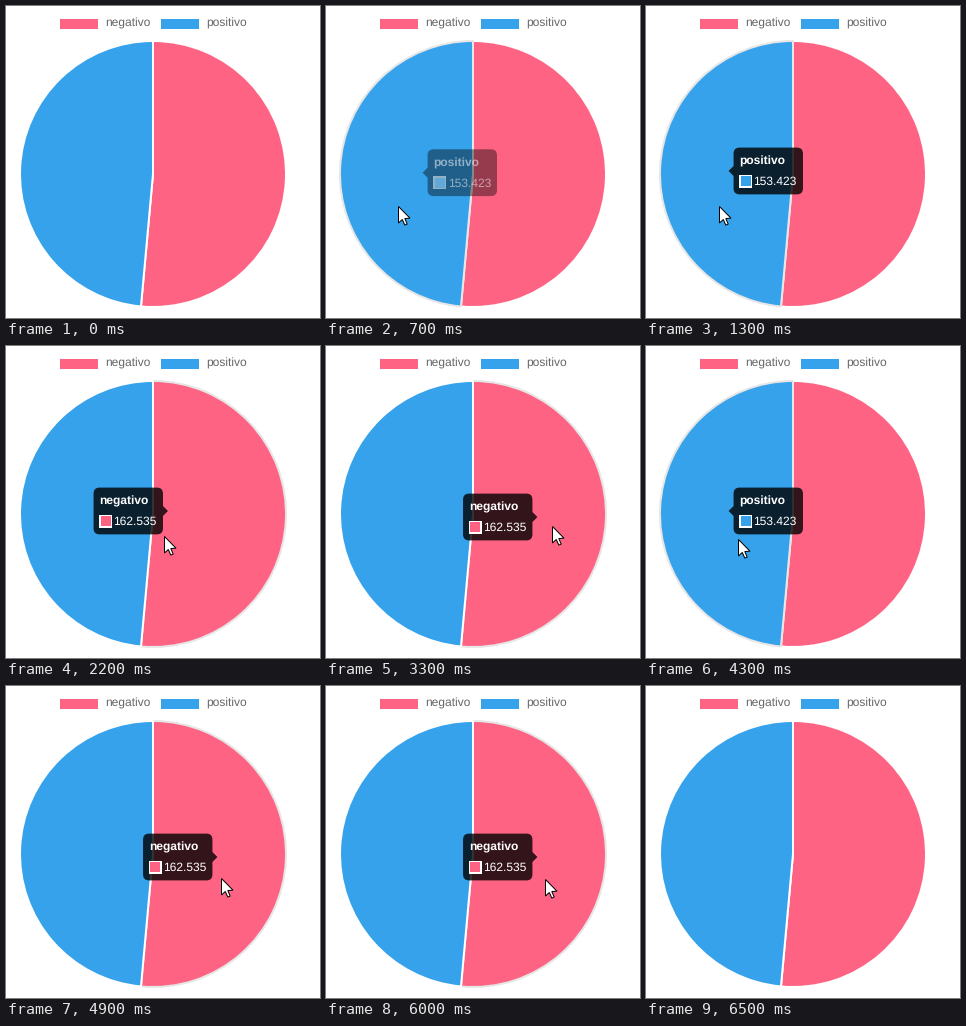
Write a matplotlib script that moves like this. It is 314x312 px and loops after 7300 ms.

```python
import numpy as np
import matplotlib.pyplot as plt
from matplotlib.animation import FuncAnimation
from matplotlib.patches import PathPatch, Polygon, Rectangle, Wedge
from matplotlib.path import Path

W, H, DPI = 314, 312, 64
FRAMES, STEP = 73, 100
PT = 72 / DPI  # points per pixel

plt.rcParams["font.family"] = "Liberation Sans"
plt.rcParams["text.hinting"] = "none"

LABELS = ["negativo", "positivo"]
VALUES = [162535, 153423]
COLORS = ["#ff6384", "#36a2eb"]
HOVER_EDGE = "#e6e6e6"

CX, CY, R = 147, 168, 133
TIP_W, TIP_H, CORNER, CARET = 69.4, 46.8, 6, 5

# (visible from, tween start, hovered slice)
HOVERS = [(0, 0, None), (600, 600, 1), (2200, 2200, 0), (3400, 3400, 1),
          (4900, 4500, 0), (6500, 6500, None)]
TWEEN = 370

# time, x, y of the pointer tip
POINTER = np.array([
    (600, 72, 200), (1200, 72, 200), (1300, 73, 200), (2000, 73, 200),
    (2100, 104, 197), (2200, 158, 190), (2300, 198, 184), (2400, 220, 181),
    (2500, 228, 181), (2600, 229, 181), (3200, 229, 181), (3300, 226, 180),
    (3400, 140, 186), (3500, 106, 191), (3600, 95, 193), (3700, 91, 193),
    (4200, 91, 193), (4300, 92, 193), (4800, 92, 193), (4900, 215, 192),
    (5000, 218, 192), (5100, 219, 193)])
ARROW = np.array([(0, 0), (0, 16.5), (3.8, 13), (6.3, 18.6),
                  (8.7, 17.6), (6.3, 12), (11.5, 11.7)])

fig = plt.figure(figsize=(W / DPI, H / DPI), dpi=DPI, facecolor="white")
ax = fig.add_axes([0, 0, 1, 1])
ax.set_xlim(0, W)
ax.set_ylim(H, 0)
ax.axis("off")


def label(x, y, text, color="white", **kw):
    return ax.text(x, y, text, color=color, fontsize=12 * PT,
                   va="baseline", **kw)


def box(color, size, **kw):
    return ax.add_patch(Rectangle((0, 0), size, size, fc=color, lw=0, **kw))


def tip_home(i):
    """Top-left corner of the tooltip when it rests on slice i."""
    mid = np.radians((edges[i] + edges[i + 1]) / 2)
    x, y = CX + R / 2 * np.cos(mid), CY + R / 2 * np.sin(mid)
    x += 2 + CARET if i == 1 else -2 - CARET - TIP_W
    return np.array([x, y - TIP_H / 2])


def bubble(x, y, caret_left):
    """Rounded box with a caret on one side."""
    r, b, c, m = x + TIP_W, y + TIP_H, CORNER, y + TIP_H / 2
    M, L, Q = Path.MOVETO, Path.LINETO, Path.CURVE3
    pts = [(M, x + c, y), (L, r - c, y), (Q, r, y), (Q, r, y + c)]
    if not caret_left:
        pts += [(L, r, m - CARET), (L, r + CARET, m), (L, r, m + CARET)]
    pts += [(L, r, b - c), (Q, r, b), (Q, r - c, b),
            (L, x + c, b), (Q, x, b), (Q, x, b - c)]
    if caret_left:
        pts += [(L, x, m + CARET), (L, x - CARET, m), (L, x, m - CARET)]
    pts += [(L, x, y + c), (Q, x, y), (Q, x + c, y)]
    return Path([p[1:] for p in pts], [p[0] for p in pts])


edges = -90 + 360 * np.cumsum([0] + VALUES) / sum(VALUES)
slices = [ax.add_patch(Wedge((CX, CY), R, edges[i], edges[i + 1],
                             fc=COLORS[i], ec="white", lw=2 * PT,
                             joinstyle="bevel", zorder=1 + i))
          for i in range(2)]

for x, name, color in zip((54, 155), LABELS, COLORS):
    ax.add_patch(Rectangle((x, 13), 38, 10, fc=color, lw=0))
    label(x + 45, 21, name, "#666666")

tip = ax.add_patch(PathPatch(bubble(0, 0, True), fc="black", lw=0, zorder=5))
frame_box = box("white", 13, zorder=6)
key_box = box("white", 10, zorder=7)
title = label(0, 0, "", weight="bold", zorder=7)
value = label(0, 0, "", zorder=7)
tip_parts = [tip, frame_box, key_box, title, value]
pointer = ax.add_patch(Polygon(ARROW, closed=True, fc="white", ec="black",
                               lw=PT, joinstyle="miter", zorder=9))


def draw_tip(i, x, y, alpha):
    tip.set_path(bubble(x, y, i == 1))
    for part in tip_parts:
        part.set_alpha(alpha)
    tip.set_alpha(0.8 * alpha)
    row = y + 33.6
    frame_box.set_xy((x + 5.5, row - 6.5))
    key_box.set_xy((x + 7, row - 5))
    key_box.set_facecolor(COLORS[i])
    title.set_position((x + 6, y + 17))
    title.set_text(LABELS[i])
    value.set_position((x + 20, row + 4))
    value.set_text(f"{VALUES[i]:,}".replace(",", "."))


def update(n):
    t = n * STEP
    _, start, active = [h for h in HOVERS if h[0] <= t][-1]
    shown = active is not None
    for part in tip_parts + [pointer]:
        part.set_visible(shown)
    for i, s in enumerate(slices):
        s.set_edgecolor(HOVER_EDGE if i == active else "white")
    if shown:
        p = 1 - (1 - min((t - start) / TWEEN, 1)) ** 4
        a, b = tip_home(1 - active), tip_home(active)
        fade = p ** 2 if start == HOVERS[1][1] else 1
        draw_tip(active, *(a + (b - a) * p), fade)
        tx, px, py = POINTER.T
        pointer.set_xy(ARROW + (np.interp(t, tx, px) + 0.5,
                                np.interp(t, tx, py) + 0.5))
    return slices + tip_parts + [pointer]


anim = FuncAnimation(fig, update, frames=FRAMES, interval=STEP,
                     repeat=True, repeat_delay=0, blit=False)
plt.show()
```
